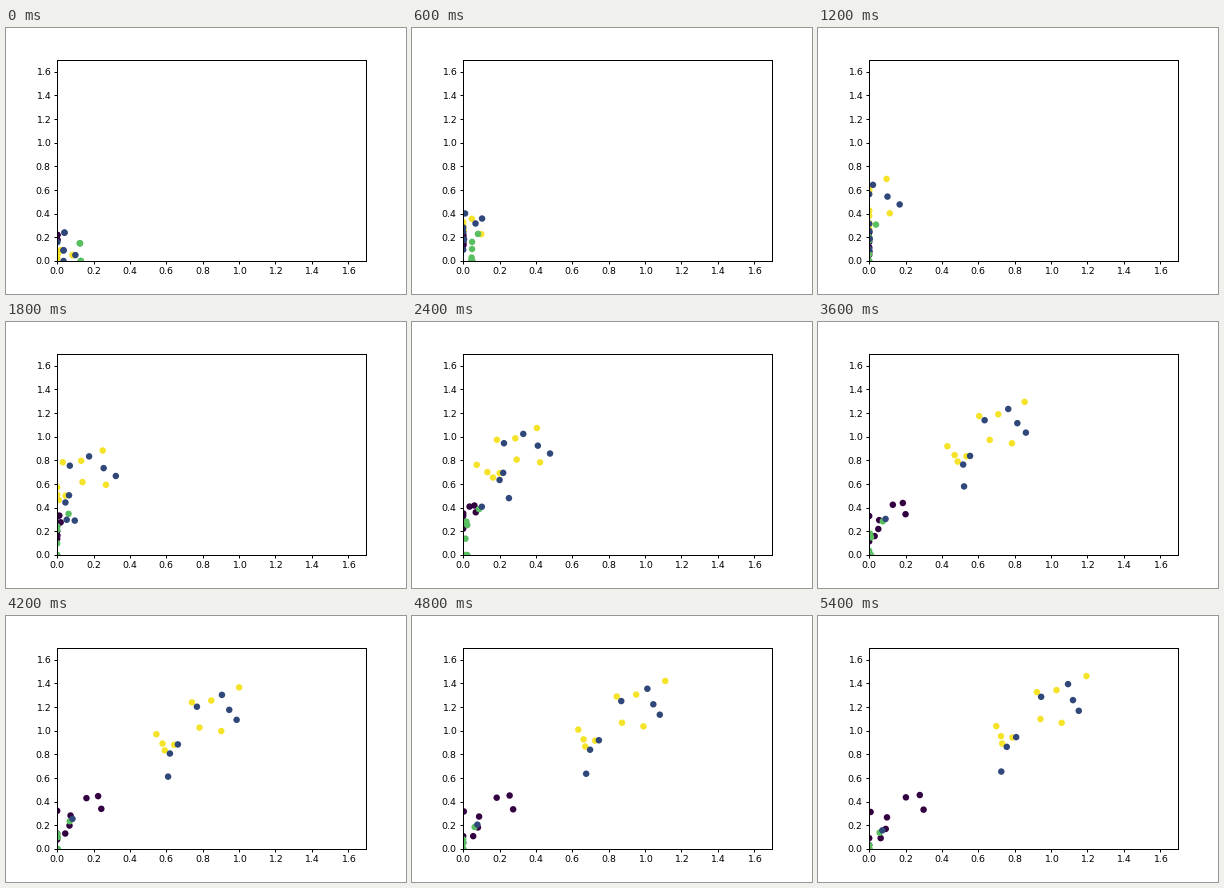
A matplotlib script for the animation above (6000 ms loop, 400 by 266 pixels).

```python
import itertools

import matplotlib.pyplot as plt
import numpy as np
from matplotlib.animation import FuncAnimation

W, H, DPI = 400, 266, 64
PT = 72 / DPI              # points per pixel
FRAMES, STEP = 10, 600
RISE, TURN, KEY, LAST = 2, 4, 6, FRAMES - 1
DOT = 6.5                  # dot diameter in pixels

YELLOW, PURPLE, GREEN, BLUE = "#f5e32a", "#330042", "#5abf60", "#30477a"


def ease(step, k):
    """Slowing progress from 0 at TURN to 1 at LAST."""
    s = (step - TURN) / (LAST - TURN)
    return (1 - np.exp(-k * s)) / (1 - np.exp(-k))


class Group:
    """Dots that start near the origin, climb together, then drift by a rule.

    keys are the places at step KEY, drift gives the late move at a place,
    climb is the shared move between RISE and TURN.
    """

    def __init__(self, color, starts, keys, drift, climb, k):
        self.color, self.k = color, k
        self.keys = np.array(keys)
        n = len(keys)
        self.starts = np.array(list(itertools.islice(itertools.cycle(starts), n)))
        self.move = np.column_stack(np.broadcast_arrays(*drift(*self.keys.T)))
        self.climb = np.array(climb)

    def late(self, step):
        return self.keys + self.move * (ease(step, self.k) - ease(KEY, self.k))

    def at(self, step):
        if step >= TURN:
            p = self.late(step)
        elif step >= RISE:
            p = self.late(TURN) - self.climb * (TURN - step) / (TURN - RISE)
        else:
            goal = self.late(TURN) - self.climb
            p = self.starts + (goal - self.starts) * step / RISE
        return np.maximum(p, 0)


def outward(x, y):
    return 0.22 + 0.44 * y, 0.3 * y


def spread(x, y):
    return 0.05 + 0.9 * x, 0.7 * y - 0.27


def sink(x, y):
    return -0.03 + 0 * x, -0.25


groups = [
    Group(YELLOW, [(0, 0.05), (0, 0.02), (0.02, 0.09), (0.085, 0.05), (0, 0)],
          [(0.43, 0.92), (0.47, 0.845), (0.487, 0.79), (0.535, 0.835),
           (0.605, 1.175), (0.71, 1.19), (0.855, 1.295), (0.663, 0.973),
           (0.785, 0.945)],
          outward, (0.31, 0.38), 1.4),
    Group(PURPLE, [(0, 0.22), (0, 0.18)],
          [(0.2, 0.345), (0.185, 0.44), (0.13, 0.425), (-0.01, 0.33),
           (0.055, 0.295), (0.05, 0.22), (0.03, 0.16), (-0.02, 0.16),
           (-0.02, 0.115)],
          spread, (0.1, 0.17), 1.4),
    Group(GREEN, [(0.125, 0.15), (0.13, 0)],
          [(0.075, 0.285), (0.005, 0.18), (0.01, 0.15), (0, 0.035),
           (0, -0.2), (0.01, -0.2)],
          sink, (0.05, 0.08), 0.1),
    Group(BLUE, [(0.035, 0.09), (0.04, 0.24), (0.1, 0.05), (0.035, 0), (0, 0.16)],
          [(0.522, 0.58), (0.517, 0.765), (0.555, 0.838), (0.635, 1.14),
           (0.765, 1.235), (0.815, 1.115), (0.862, 1.035)],
          outward, (0.31, 0.38), 1.4),
    Group(BLUE, [(0, 0.16)], [(0.09, 0.305)], sink, (0.1, 0.22), 0.1),
]


def positions(step):
    return np.vstack([g.at(step) for g in groups])


plt.rcParams["font.family"] = "DejaVu Sans"
fig = plt.figure(figsize=(W / DPI, H / DPI), dpi=DPI, facecolor="white")
left, right, top, bottom = 51, 360, 32, 233
ax = fig.add_axes([(left + 0.2) / W, 1 - bottom / H,
                   (right - left) / W, (bottom - top) / H])
ax.set(xlim=(0, 1.7), ylim=(0, 1.7))
ticks = np.arange(0, 1.7, 0.2)
labels = [f"{t:.1f}" for t in ticks]
ax.set_xticks(ticks, labels)
ax.set_yticks(ticks, labels)
ax.tick_params(length=3.24 * PT, width=PT, pad=3.24 * PT, labelsize=9.4 * PT)
for spine in ax.spines.values():
    spine.set_linewidth(PT)

colors = [g.color for g in groups for _ in g.keys]
dots = ax.scatter(*positions(0).T, s=(DOT * PT) ** 2, c=colors, linewidths=0)


def draw(step):
    dots.set_offsets(positions(step))
    return (dots,)


anim = FuncAnimation(fig, draw, frames=FRAMES, interval=STEP, repeat=True,
                     repeat_delay=0, blit=False)
plt.show()
```
